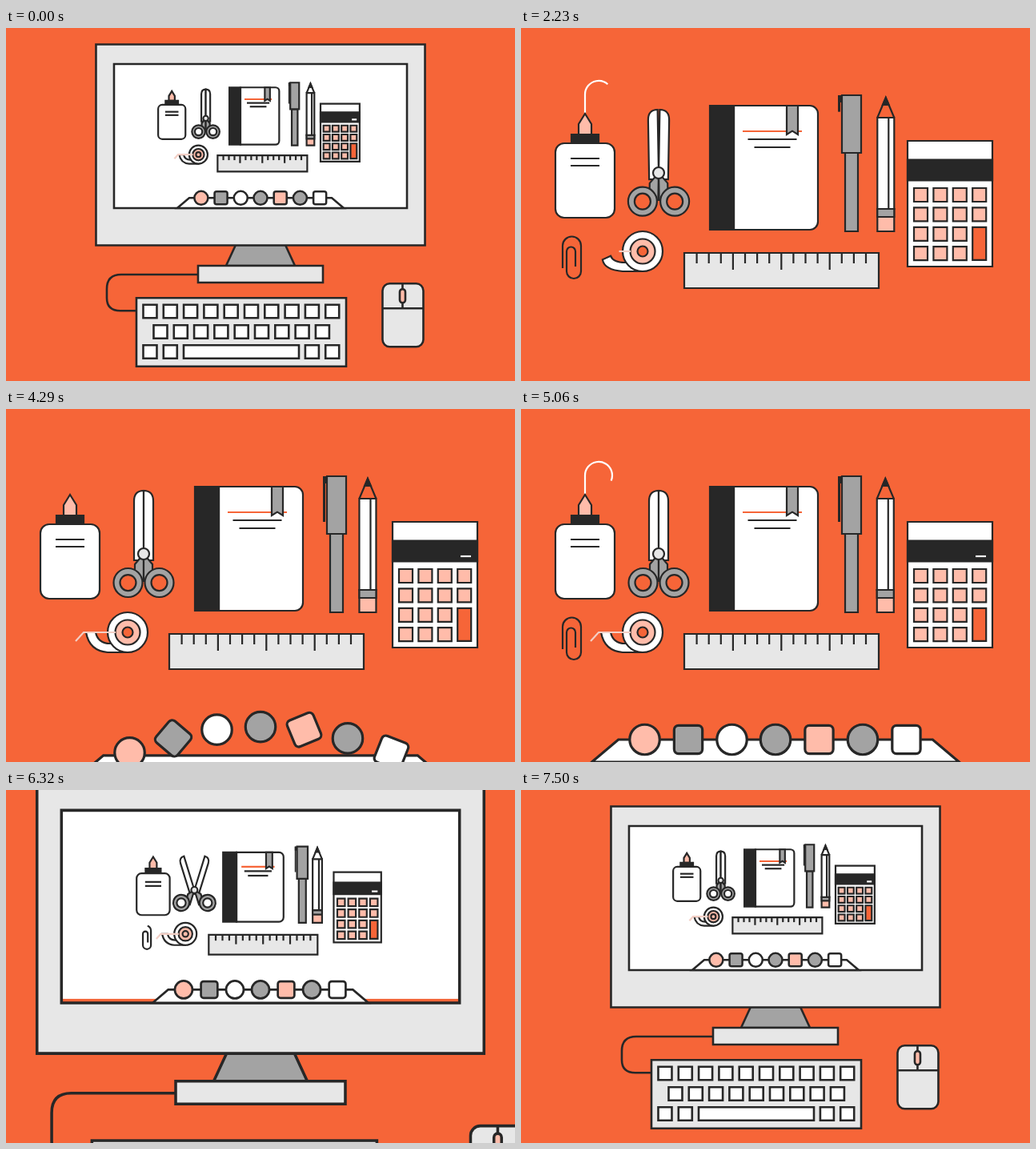
Write an HTML page with a canvas that moves like this. It is 636 px wide and 441 px high and loops after 7570 ms.

```html
<!DOCTYPE html>
<html lang="en">
<head>
<meta charset="utf-8">
<title>Desk to desktop</title>
<style>
html, body { margin: 0; width: 100%; height: 100%; overflow: hidden; background: #f66538; }
canvas { display: block; }
</style>
</head>
<body>
<canvas id="stage" width="636" height="441"></canvas>
<script>
const ctx = document.getElementById('stage').getContext('2d');
const LOOP = 7570;
const ORANGE = '#f66538', INK = '#272727', GREY = '#a3a3a3', LIGHT = '#e7e7e7', PINK = '#ffbcaa', WHITE = '#fff';
const PI = Math.PI;

const clamp = x => Math.min(1, Math.max(0, x));
// Smooth progress from 0 to 1 between times a and b
const ease = (t, a, b) => { const x = clamp((t - a) / (b - a)); return x * x * (3 - 2 * x); };

function layer(s, x, y, width) {
  ctx.setTransform(s, 0, 0, s, x, y);
  ctx.lineWidth = width / s;
  ctx.strokeStyle = INK;
}
function paint(fill) {
  if (fill) { ctx.fillStyle = fill; ctx.fill(); }
  ctx.stroke();
}
function box(x, y, w, h, fill, r = 0) {
  if (w < .5 || h < .5) return;
  ctx.beginPath();
  ctx.roundRect(x, y, w, h, r);
  paint(fill);
}
function circle(x, y, r, fill) {
  if (r < .3) return;
  ctx.beginPath();
  ctx.arc(x, y, r, 0, 2 * PI);
  paint(fill);
}
function path(d, fill) {
  const p = new Path2D(d);
  if (fill) { ctx.fillStyle = fill; ctx.fill(p); }
  ctx.stroke(p);
}
function line(x1, y1, x2, y2, color = INK) {
  ctx.strokeStyle = color;
  ctx.beginPath();
  ctx.moveTo(x1, y1);
  ctx.lineTo(x2, y2);
  ctx.stroke();
  ctx.strokeStyle = INK;
}
function centeredLine(cx, y, half, color) {
  if (half > .2) line(cx - half, y, cx + half, y, color);
}
function partOf(d, from, to, color) {
  if (to - from < .5) return;
  ctx.strokeStyle = color;
  ctx.setLineDash([to - from, 999]);
  ctx.lineDashOffset = -from;
  path(d);
  ctx.setLineDash([]);
  ctx.strokeStyle = INK;
}

function glue(t) {
  for (const start of [1930, 4550]) {
    const p = t - start, head = 94 * (1 - (1 - clamp(p / 1000)) ** 3);
    partOf('M80 106V83A17 17 0 1 1 105.5 97.7', 94 * ease(p, 1150, 1750), head, WHITE);
  }
  const tip = ease(t, 1500, 1700), cap = 11 * ease(t, 1350, 1520);
  if (tip > 0) path(`M72 133V${133 - 13 * tip}L80 ${133 - 26 * tip}L88 ${133 - 13 * tip}V133Z`, PINK);
  box(63, 144 - cap, 34, cap, INK);
  const w = 74 * ease(t, 830, 1080), h = 25 + 68 * ease(t, 1110, 1400);
  box(80 - w / 2, 237 - h, w, h, WHITE, Math.min(11, w / 2));
  const label = 18 * ease(t, 1400, 1650);
  centeredLine(80, 163, label);
  centeredLine(80, 172, label);
}

function scissors(t) {
  let open = 0;
  for (const s of [2180, 5270]) open += ease(t, s, s + 350) - ease(t, s + 1100, s + 1600);
  const arm = ease(t, 1290, 1450), blade = 79 * ease(t, 1430, 1750);
  for (const side of [-1, 1]) {
    ctx.save();
    ctx.translate(172, 181);
    ctx.scale(side, 1);
    ctx.rotate(open * .3);
    const size = side > 0 ? ease(t, 1000, 1290) : ease(t, 1050, 1317);
    if (blade > 1) path(`M0 8V${-blade}Q12 ${-blade} 12 ${-blade + Math.min(13, blade)}V8Z`, WHITE);
    ctx.restore();
    ctx.save();
    ctx.translate(172, 181);
    ctx.scale(side, 1);
    ctx.rotate(-open * .3);
    if (arm > 0) path(`M0 ${34 - 34 * arm}L11 ${34 - 21 * arm}V24L6 34H0Z`, GREY);
    circle(19.5, 36, 18 * size, GREY);
    ctx.restore();
  }
  // Finger holes show whatever lies behind the scissors
  for (const side of [-1, 1]) {
    const a = Math.atan2(36, 19.5) - open * .3, r = 41;
    circle(172 + side * r * Math.cos(a), 181 + r * Math.sin(a), 10 * ease(t, 1130, 1400), backdrop);
  }
  circle(172, 181, 7 * ease(t, 1400, 1520), LIGHT);
}

function notebook(t) {
  const cover = 105 * ease(t, 1150, 1500), h = 155 * ease(t, 830, 1180);
  box(266, 97, cover, 155, WHITE, [0, 10, 10, 0]);
  box(236, 174.5 - h / 2, 30, h, INK);
  const lines = ease(t, 1450, 1800), mark = 36 * ease(t, 1500, 1720);
  centeredLine(314, 129, 37 * lines, ORANGE);
  centeredLine(314, 139, 30.5 * lines);
  centeredLine(314, 149, 22.5 * lines);
  if (mark > 1) path(`M332 97H346V${97 + mark}L339 ${97 + mark * .88}L332 ${97 + mark}Z`, GREY);
}

function pen(t) {
  const g = ease(t, 1060, 1420), top = 254 - 170 * g;
  box(405, 254 - 98 * g, 16, 98 * g, GREY);
  box(401, top, 24, 72 * g, GREY);
  const clip = 57 * ease(t, 1950, 2640);
  if (clip > 1) {
    ctx.fillStyle = INK;
    ctx.fillRect(396, 84, 5, Math.min(clip, 9));
    ctx.fillRect(396, 84, 3, clip);
  }
}

function pencil(t) {
  const x = 440.5 + 4.8 * Math.cos(2 * PI * (t - 7500) / 2635);
  const h = 114 * ease(t, 990, 1330), y = 169 - h / 2;
  const tip = 25 * ease(t, 1330, 1550), end = ease(t, 1330, 1550);
  if (tip > 1) {
    path(`M${x} 112L${x + 10.5} ${112 - tip}L${x + 21} 112`);
    path(`M${x + 6.7} ${112 - tip * .64}L${x + 10.5} ${112 - tip}L${x + 14.3} ${112 - tip * .64}Z`, INK);
  }
  box(x, 226, 21, 28 * end, PINK);
  box(x, 226, 21, 10 * end, GREY);
  box(x, y, 21, h, WHITE);
  if (t > 1150) line(x + 14, y, x + 14, y + h);
}

function calculator(t) {
  const w = 106 * ease(t, 1030, 1345);
  box(536 - w / 2, 141, w, 157, WHITE);
  box(536 - w / 2, 164.5, w, 26, INK);
  for (let i = 0; i < 15; i++) {
    const col = i % 4, row = i >> 2, tall = i === 11;
    const g = ease(t, 1350 + i * 25, 1550 + i * 25), size = 17 * g;
    const h = tall ? 41 : 17, x = 491 + col * 24.4, y = 200 + row * 24.4;
    box(x + (17 - size) / 2, y + h * (1 - g) / 2, size, h * g, tall ? ORANGE : PINK);
  }
  if (t > 2500) line(568, 184, 581, 184, WHITE);
}

function ruler(t) {
  const w = 243 * ease(t, 830, 1830);
  box(204, 281, w, 44, LIGHT);
  for (let i = 1; i < 16; i++) {
    const x = 204.5 + i * 15.1, g = clamp((204 + w - x) / 60);
    const len = (i % 4 ? 13 : 21) * (t > 1900 ? 1 : g);
    if (len > 0) line(x, 281, x, 281 + len);
  }
}

function tape(t) {
  const g = ease(t, 1400, 1700), out = ease(t, 2150, 2700);
  const y = 290 - 11 * out;
  if (t > 1750) {
    path(`M152 304H127Q104 302 ${102 - 2 * out} ${y}L112 ${y - 5 * (1 - out)}Q115 293 130 293H152Z`, WHITE);
  }
  circle(152, 279, 25 * g, WHITE);
  circle(152, 279, 15.5 * g, PINK);
  circle(152, 279, 6.5 * g, backdrop === WHITE ? PINK : ORANGE);
  partOf('M137 279H97L87 290', 0, 12 * ease(t, 1900, 2150) + 43 * out, '#f3cfc5');
}

function paperclip(t) {
  const d = 'M52 300V272A11.5 11.5 0 0 1 75 272V304A9 9 0 0 1 57 304V279A5.5 5.5 0 0 1 68 279V298';
  for (const start of [1930, 4550]) {
    const p = t - start;
    partOf(d, 186 * ease(p, 1500, 2300), 186 * ease(p, 0, 300), INK);
  }
}

function dock(t, scale, base) {
  if (t < 3950) return;
  const drop = 50 * (1 - ease(t, 3950, 4550));
  const hop = Math.sin(PI * clamp((t - 4000) / 750));
  layer(scale, 318, base + drop, 2 + .55 * scale);
  path('M-104 0L-89 -12.7H89L104 0Z', WHITE);
  const fills = [PINK, GREY, WHITE, GREY, PINK, GREY, WHITE];
  const turns = { 1: .75, 4: -.42, 6: .4 };
  fills.forEach((fill, i) => {
    const d = i - 3;
    ctx.save();
    ctx.translate(d * 24.7, -12.7 - hop * 17.3 * (1 - d * d / 10));
    if (turns[i]) {
      ctx.rotate(turns[i] * hop);
      box(-8, -8, 16, 16, fill, 2.5);
    } else circle(0, 0, 8.5, fill);
    ctx.restore();
  });
}

function monitor(t, s, u) {
  const x = 318 * (1 - s), y = 111 * (1 - s), width = 2.6 * s;
  const late = u ** 2.5, keysDrop = 20 * late, top = 45 + 3 * late;
  layer(s, x, y, width);
  ctx.fillStyle = WHITE;
  ctx.fillRect(135, top, 366, (225 - top) * ease(t, 5640, 6385));
  path('M287 271H349L361 297H275Z', GREY);
  const plug = 353 + keysDrop / s;
  path(`M240 308H144Q126 308 126 326V${plug - 16}Q126 ${plug} 143 ${plug}H163`);
  box(240, 297, 156, 21, LIGHT);
  ctx.beginPath();
  ctx.rect(112.5, 20.5, 411, 251);
  ctx.rect(135, top, 366, 225 - top);
  ctx.fillStyle = LIGHT;
  ctx.fill('evenodd');
  ctx.stroke();

  layer(s, x, y + keysDrop, width);
  box(163, 337, 262, 85.5, LIGHT);
  for (let i = 0; i < 10; i++) {
    const kx = 171.5 + i * 25.3;
    box(kx, 345.5, 17, 16.5, WHITE);
    if (i < 9) box(kx + 13, 371, 17, 16.5, WHITE);
    if (i < 2 || i > 7) box(kx, 396, 17, 16.5, WHITE);
  }
  box(222, 396, 144, 16.5, WHITE);

  layer(s, x + 56 * late, y + 26 * late, width);
  box(470, 319, 51, 79, LIGHT, 9);
  line(470, 350, 521, 350);
  line(495, 319, 495, 350);
  box(491.5, 326, 7, 17, PINK, 3.5);
}

let backdrop = ORANGE;

function scene(t) {
  // Remaining zoom: one at mid pull-back, near zero at the end
  const u = Math.max(0, (7700 - t) / 1380);
  const screen = 1 + .36 * u ** 4;
  const items = .461 + Math.min(.539, .099 * u ** 3.94);
  const dockScale = 1 + Math.min(1.206, .297 * u ** 3.27);
  if (t > 5400) monitor(t, screen, u);
  backdrop = t > 6000 ? WHITE : ORANGE;
  layer(items, 316 * (1 - items), 60 * (1 - items) - 2.8 * ease(t, 5480, 5600), 2.2);
  for (const draw of [glue, scissors, notebook, pen, pencil, calculator, ruler, tape, paperclip]) draw(t);
  dock(t, dockScale, Math.min(441, 111 + 114 * screen));
}

function frame(now) {
  const t = now % LOOP;
  ctx.setTransform(1, 0, 0, 1, 0, 0);
  ctx.fillStyle = ORANGE;
  ctx.fillRect(0, 0, 636, 441);
  if (t < 690) {
    scene(7500);
    ctx.setTransform(1, 0, 0, 1, 0, 0);
    ctx.globalAlpha = clamp((t - 35) / 655);
    ctx.fillStyle = ORANGE;
    ctx.fillRect(0, 0, 636, 441);
    ctx.globalAlpha = 1;
  } else if (t > 800) scene(t);
  requestAnimationFrame(frame);
}
requestAnimationFrame(frame);
</script>
</body>
</html>
```
